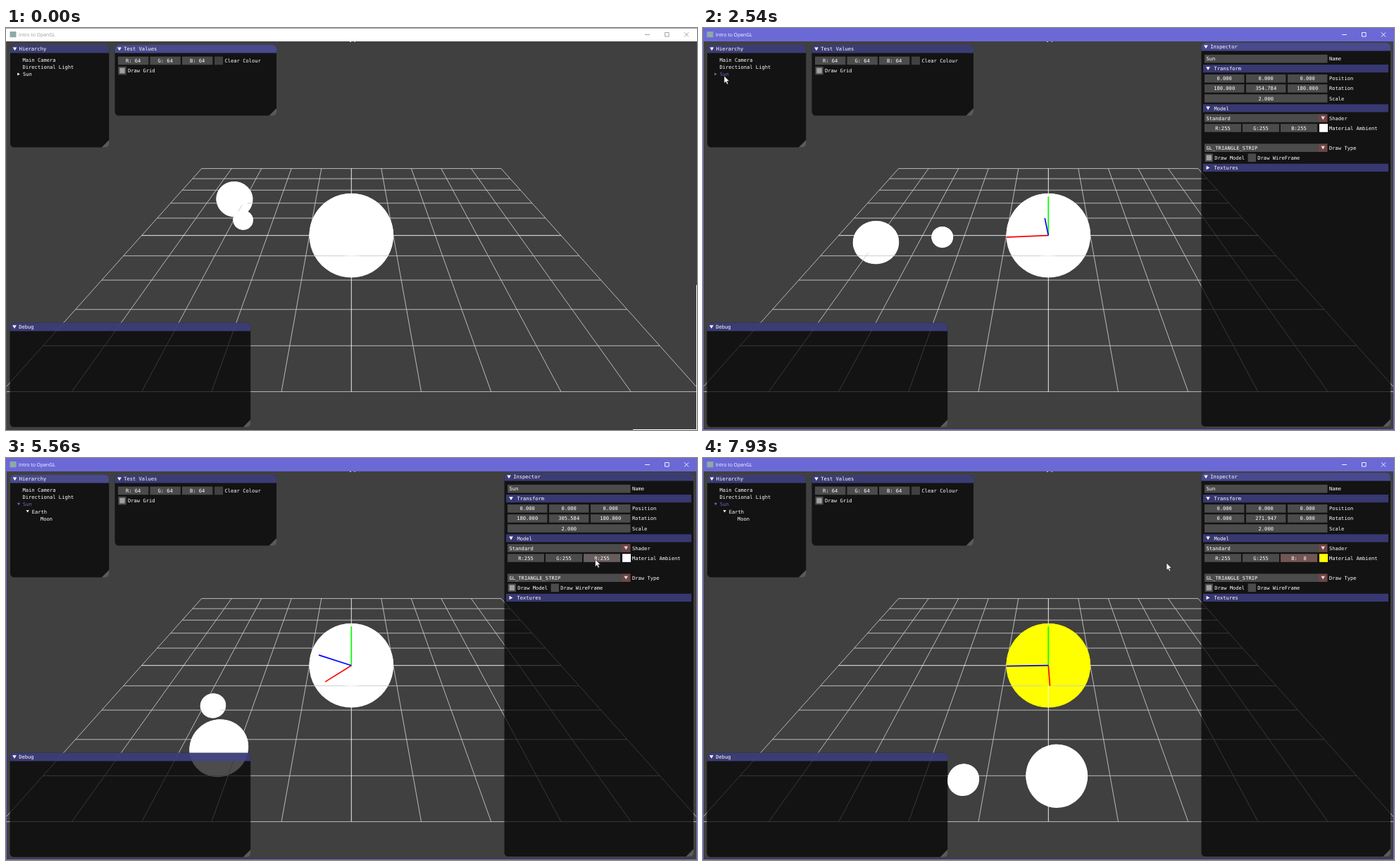
These frames come from a looping animation (981x571 px, 7990 ms). An HTML page:

```html
<!DOCTYPE html>
<html lang="en">
<head>
<meta charset="utf-8">
<title>Intro to OpenGL</title>
<style>
  html, body { margin: 0; width: 100%; height: 100%; overflow: hidden; background: #404040; }
  svg { display: block; width: 981px; height: 571px; }
  text { font: 7.12px "DejaVu Sans Mono", monospace; white-space: pre; text-rendering: geometricPrecision; }
  .caption { font: 6.9px "Open Sans", sans-serif; }
</style>
</head>
<body>
<svg id="stage" viewBox="0 0 981 571"></svg>
<script>
const LOOP = 7990;
const stage = document.getElementById('stage');

// ---- timeline: the picture advances in steps, eleven per chunk ----
const CHUNKS = [60, 860, 1660, 2480, 3280, 4100, 4900, 5720, 6520, 7330, 8155];
const SELECT_SUN = 23, OPEN_SUN = 39, SELECT_EARTH = 50, RESELECT_SUN = 68, PRESS_BLUE = 101;
const SPIN = [[0, 145.3], [23, 172.25], [46, 199.361], [64, 220.307], [87, 247.35], [102, 264.856], [108, 271.947]];
const MOUSE = [
  [5, 836, 528], [11, 541, 338], [19, 32, 70], [23, 32, 67.5], [34, 30, 68], [38, 19, 64],
  [41, 19, 64], [46, 26, 78], [49, 29, 76], [54, 29, 76], [64, 25, 64], [68, 25, 64],
  [75, 878, 144], [77, 795, 144], [87, 750, 142.5], [92, 765, 144], [99, 849, 144],
  [102, 849, 144], [108, 658, 149]
];

function stepAt(t) {
  if (t < CHUNKS[0]) return 0;
  let i = 0;
  while (t >= CHUNKS[i + 1]) i++;
  const part = (t - CHUNKS[i]) / (CHUNKS[i + 1] - CHUNKS[i]);
  return 1 + 11 * i + Math.min(10, Math.floor(part * 11 + 0.15));
}

function track(keys, n, col = 1) {
  let i = 0;
  while (i < keys.length - 2 && n >= keys[i + 1][0]) i++;
  const a = keys[i], b = keys[i + 1];
  const k = Math.min(1, Math.max(0, (n - a[0]) / (b[0] - a[0])));
  return a[col] + (b[col] - a[col]) * k;
}

// ---- 3D scene: camera at (0, 5, 10) looking at the origin, 45 degree view ----
const CAM = [0, 5, 10], DIST = Math.hypot(...CAM), SIN = 5 / DIST, COS = 10 / DIST;
const FOCAL = 275.7 / Math.tan(Math.PI / 8), CX = 490.3, CY = 294.7;

function project([x, y, z]) {
  const s = FOCAL / (DIST - y * SIN - z * COS);
  return [(CX + x * s).toFixed(2), (CY - (y * COS - z * SIN) * s).toFixed(2)];
}
const path = points => 'M' + points.map(project).join('L');
const mix = (...terms) => [0, 1, 2].map(i => terms.reduce((sum, [v, k]) => sum + v[i] * k, 0));
const arc = (from, to, at) => Array.from({ length: 49 }, (_, i) => at(from + (to - from) * i / 48));
const line = (a, b, color, width) =>
  `<path d="${path([a, b])}" stroke="${color}" stroke-width="${width}" fill="none"/>`;

// Outline of a sphere and of its upper half, which hides the grid plane.
function ball(c, r, color) {
  const v = mix([CAM, 1], [c, -1]), d = Math.hypot(...v), n = mix([v, 1 / d]);
  const h = Math.hypot(n[0], n[2]);
  const side = [n[2] / h, 0, -n[0] / h], front = [n[0] / h, 0, n[2] / h];
  const up = [-n[1] * n[0] / h, h, -n[1] * n[2] / h];
  const near = r * r / d, rho = Math.sqrt(r * r - near * near);
  const rim = a => mix([c, 1], [n, near], [side, rho * Math.cos(a)], [up, rho * Math.sin(a)]);
  const equator = a => mix([c, 1], [side, r * Math.cos(a)], [front, r * Math.sin(a)]);
  const a0 = -Math.asin(n[1] * near / (rho * h)), b0 = Math.asin(r / (d * h));
  const shape = points => `<path d="${path(points)}Z" fill="${color}"/>`;
  return {
    whole: shape(arc(0, 2 * Math.PI, rim)),
    top: shape([...arc(a0, Math.PI - a0, rim), ...arc(Math.PI - b0, b0, equator)])
  };
}

function makeGrid() {
  let thin = '', bold = '';
  for (let i = -5; i <= 5; i++) {
    const pair = c => line([i, 0, -5], [i, 0, 5], c, 0.9) + line([-5, 0, i], [5, 0, i], c, 0.9);
    if (i) thin += pair('#c8c8c8'); else bold += pair('#fff');
  }
  return thin + bold;
}
const GRID = makeGrid();

function axes(c, angle, size) {
  const x = [Math.cos(angle), 0, -Math.sin(angle)], z = [Math.sin(angle), 0, Math.cos(angle)];
  const axis = (dir, color) => line(c, mix([c, 1], [dir, size]), color, 1.7);
  return axis(x, '#f00') + axis([0, 1, 0], '#0f0') + axis(z, '#00f');
}

function scene(s) {
  const a = s.spin * Math.PI / 180;
  const sun = [0, 0, 0];
  const earth = [4 * Math.cos(a), 0, -4 * Math.sin(a)];
  const moon = mix([earth, 1], [[Math.cos(2 * a), 0, -Math.sin(2 * a)], 1.5]);
  const balls = [ball(sun, 1, `rgb(255,255,${s.blue})`), ball(earth, 0.5, '#fff'), ball(moon, 0.25, '#fff')];
  const gizmo = s.pick === 'Sun' ? axes(sun, a, 1) : s.pick === 'Earth' ? axes(earth, 2 * a, 0.5) : '';
  return balls.map(b => b.whole).join('') + GRID + balls.map(b => b.top).join('') + gizmo;
}

// ---- widgets ----
const FRAME = 'rgba(204,204,204,.3)', HOVER = 'rgba(230,204,204,.4)', ACTIVE = 'rgba(230,166,166,.45)';
const rect = (x, y, w, h, fill) => `<rect x="${x}" y="${y}" width="${w}" height="${h}" fill="${fill}"/>`;
const text = (x, y, str, fill = '#fff', anchor = 'start') =>
  `<text x="${x}" y="${y + 2.5}" fill="${fill}" text-anchor="${anchor}">${str}</text>`;
const box = (x, y, w, fill = FRAME) => rect(x, y - 5.8, w, 11.6, fill);
const field = (x, y, w, str, fill) => box(x, y, w, fill) + text(x + w / 2, y, str, '#fff', 'middle');

function tri(x, y, down, size = 2.8, fill = '#fff') {
  const s = size, k = size * 0.85;
  const d = down ? `M${x - s} ${y - k}h${2 * s}L${x} ${y + k}Z` : `M${x - k} ${y - s}v${2 * s}L${x + k} ${y}Z`;
  return `<path d="${d}" fill="${fill}"/>`;
}

function panel(x, y, w, h, title, active, body) {
  const r = 5.5, t = 11.6, X = x + w, Y = y + h;
  return `<rect x="${x}" y="${y}" width="${w}" height="${h}" rx="${r}" fill="rgba(0,0,0,.7)"/>` +
    `<path d="M${x} ${y + t}V${y + r}a${r} ${r} 0 0 1 ${r} ${-r}H${X - r}a${r} ${r} 0 0 1 ${r} ${r}V${y + t}Z"
      fill="${active ? 'rgba(82,82,161,.87)' : 'rgba(69,69,138,.83)'}"/>` +
    `<path d="M${X} ${Y - 10.5}V${Y - r}a${r} ${r} 0 0 1 ${-r} ${r}H${X - 10.5}Z" fill="rgba(255,255,255,.3)"/>` +
    tri(x + 6.5, y + 5.8, true) + text(x + 12.7, y + 5.9, title) + body;
}

const check = (x, y, on, label) =>
  box(x, y, 11.4) + (on ? rect(x + 2, y - 3.8, 7.4, 7.6, 'rgba(230,230,230,.55)') : '') + text(x + 13.7, y, label);
const header = (y, label, open) =>
  rect(710, y - 5.7, 263, 11.2, 'rgba(102,102,230,.45)') + tri(717, y, open) + text(725.5, y, label);
const combo = (y, value, label) =>
  box(712, y, 162) + box(874, y, 12.5, 'rgba(171,102,102,.6)') + tri(880.2, y, true, 2.8, '#ddd') +
  text(714.5, y, value) + text(889, y, label);
const triple = (y, values, label) =>
  values.map((v, i) => field(712 + 59 * i, y, 56.4, v)).join('') + text(889, y, label);

function hierarchy(s) {
  const tone = name => s.pick === name ? '#6a6abc' : '#fff';
  const node = (x, y, name, open) => tri(x - 6, y - 0.2, open, 2.1, tone(name)) + text(x, y, name, tone(name));
  let body = text(23.5, 45, 'Main Camera') + text(23.5, 55.3, 'Directional Light') +
    node(24, 65.7, 'Sun', s.n >= OPEN_SUN);
  if (s.n >= OPEN_SUN) body += node(36.7, 76, 'Earth', s.n >= SELECT_EARTH);
  if (s.n >= SELECT_EARTH) body += text(49, 86.4, 'Moon');
  return panel(6, 24, 140.3, 145.6, 'Hierarchy', s.focus === 'Hierarchy', body);
}

function testValues(s) {
  const body = ['R', 'G', 'B'].map((c, i) => field(159 + 45.5 * i, 46.4, 43.4, c + ': 64')).join('') +
    box(296, 46.4, 12, '#404040') + text(310.5, 46.6, 'Clear Colour') + check(159.3, 60.6, true, 'Draw Grid');
  return panel(154.5, 24, 229.5, 100.5, 'Test Values', s.focus === 'Test Values', body);
}

function inspector(s) {
  const sun = s.pick === 'Sun', flipped = s.spin < 270;
  const roll = flipped ? '180.000' : '0.000';
  const yaw = (flipped ? (540 - s.spin) % 360 : s.spin).toFixed(3);
  const colours = ['R', 'G', 'B'].map((c, i) => {
    const x = 712 + 54 * i;
    const over = s.mx >= x && s.mx < x + 52 && s.my > 136 && s.my < 148;
    const held = s.n >= PRESS_BLUE;
    const fill = held ? (i === 2 ? ACTIVE : FRAME) : over ? HOVER : FRAME;
    return field(x, 142, 52, c + ':' + String(i === 2 ? s.blue : 255).padStart(3), fill);
  }).join('');
  const body =
    box(712, 43.7, 174.5) + text(714.5, 43.7, s.pick) + text(889, 43.7, 'Name') +
    header(57.7, 'Transform', true) +
    triple(71.8, [sun ? '0.000' : '2.000', '0.000', '0.000'], 'Position') +
    triple(85.9, [roll, yaw, roll], 'Rotation') +
    field(712, 100, 174.5, sun ? '2.000' : '0.500') + text(889, 100, 'Scale') +
    header(114, 'Model', true) + combo(128, 'Standard', 'Shader') +
    colours + box(875, 142, 12, `rgb(255,255,${s.blue})`) + text(889, 142, 'Material Ambient') +
    combo(170.2, 'GL_TRIANGLE_STRIP', 'Draw Type') +
    check(712.6, 184.3, true, 'Draw Model') + check(773.6, 184.3, false, 'Draw WireFrame') +
    header(198.5, 'Textures', false);
  return panel(707.5, 21, 268.5, 545, 'Inspector', s.focus === 'Inspector', body);
}

function windowFrame(on) {
  const edge = on
    ? '<path d="M.5 19V570.5H980.5V19" fill="none" stroke="#6b69d6"/>'
    : '<path d="M980.5 365V570.5H890" fill="none" stroke="#fff"/><path d="M.5 19V571" stroke="#555"/>';
  return edge + rect(0, 0, 981, 19, on ? '#6b69d6' : '#fff') +
    (on ? '' : rect(0, 0, 981, 0.7, '#777')) +
    rect(5.5, 5, 9, 8.2, '#8fa8a8') +
    `<text class="caption" x="18" y="12" fill="${on ? '#fff' : '#999'}">Intro to OpenGL</text>` +
    `<path d="M907 9.5h7M935.5 6.5h5.6v5.6h-5.6ZM963 6.3l6.2 6.2M969.2 6.3l-6.2 6.2" fill="none"
      stroke="${on ? '#fff' : '#999'}" stroke-width=".9"/>` +
    rect(488, 19, 2, 1, '#ccc') + rect(494.5, 19, 1.5, 1, '#ccc');
}

const cursor = (x, y) =>
  `<path transform="translate(${x} ${y})" d="M0 0V10.4L2.4 8.2L4.1 12L5.9 11.2L4.2 7.5H7.4Z"
    fill="#fff" stroke="#111" stroke-width=".6"/>`;

function draw(n) {
  const mx = track(MOUSE, n, 1), my = track(MOUSE, n, 2);
  const s = {
    n, mx, my,
    spin: track(SPIN, n),
    pick: n < SELECT_SUN ? '' : n >= SELECT_EARTH && n < RESELECT_SUN ? 'Earth' : 'Sun',
    focus: n < SELECT_SUN ? 'Test Values' : n >= OPEN_SUN && n < PRESS_BLUE ? 'Hierarchy' : 'Inspector',
    blue: n < PRESS_BLUE ? 255 : Math.max(0, Math.round(255 - (849 - mx) * 1.63))
  };
  stage.innerHTML = rect(0, 0, 981, 571, '#404040') + scene(s) + hierarchy(s) + testValues(s) +
    panel(5.5, 418.8, 341.7, 148, 'Debug', false, '') + (s.pick ? inspector(s) : '') +
    windowFrame(n >= SELECT_SUN) + (n >= MOUSE[0][0] ? cursor(mx, my) : '');
}

let shown = -1;
const start = performance.now();
function tick() {
  const n = stepAt((performance.now() - start) % LOOP);
  if (n !== shown) draw(shown = n);
  requestAnimationFrame(tick);
}
tick();
</script>
</body>
</html>
```
